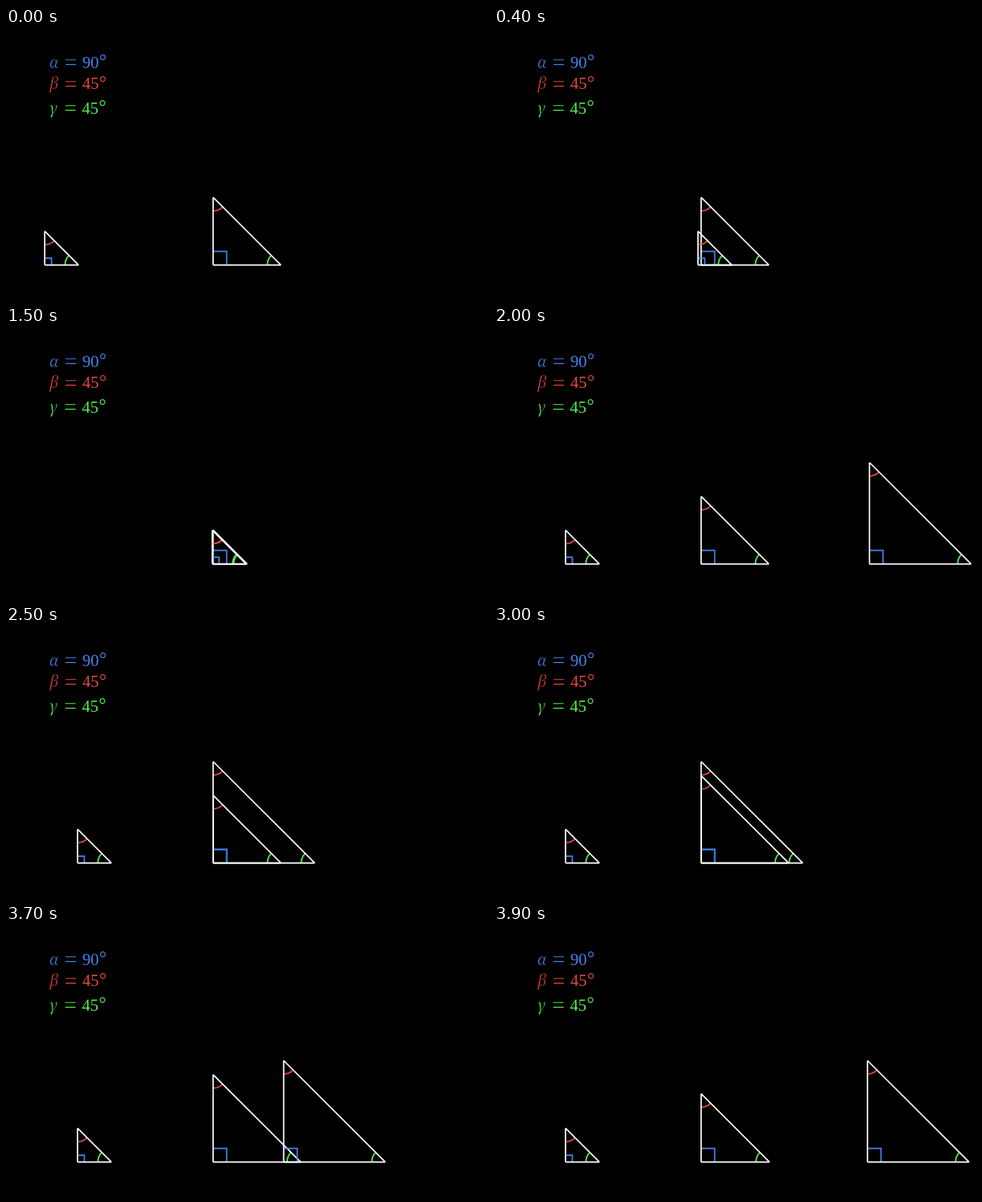
An HTML page that plays this animation: 600 by 338 pixels, repeating every 4 s.

```html
<!DOCTYPE html>
<html lang="en">
<head>
<meta charset="utf-8">
<title>Similar triangles</title>
<style>
html, body { margin: 0; width: 100%; height: 100%; overflow: hidden; background: #000; }
svg { display: block; width: 600px; height: 338px; }
text { font-family: "Liberation Serif", "Times New Roman", serif; font-size: 20.7px; }
.greek { font-family: "Noto Serif", serif; font-style: italic; font-size: 19px; stroke: #000; stroke-width: .5px; }
.equals { font-size: 29px; text-anchor: middle; stroke: #000; stroke-width: .5px; }
.degree { font-size: 23px; }
path { fill: none; stroke-width: 1.69; }
</style>
</head>
<body>
<svg id="stage" viewBox="0 0 600 338">
  <rect width="600" height="338" fill="#000"/>
</svg>
<script>
const LOOP = 4000, STEP = 100, LEAD = 100 / 3;
const UNIT = 600 * 9 / 128;
const BASE = 169 + 3 * UNIT;
const BLUE = '#4583ee', RED = '#e5483f', GREEN = '#50f04c';
const stage = document.getElementById('stage');

function add(parent, tag, attrs, content) {
  const node = document.createElementNS('http://www.w3.org/2000/svg', tag);
  for (const key in attrs) node.setAttribute(key, attrs[key]);
  if (content) node.textContent = content;
  return parent.appendChild(node);
}

function addLabel(letter, value, color, y, shift) {
  const row = add(stage, 'g', { fill: color });
  add(row, 'text', { x: 54, y, class: 'greek' }, letter);
  add(row, 'text', { x: 80.6 + shift, y: y + 3.2, class: 'equals' }, '=');
  add(row, 'text', { x: 95 + shift, y }, value);
  add(row, 'text', { x: 115.9 + shift, y: y - 0.6, class: 'degree' }, '°');
}

// Right isosceles triangle with its angle marks; lengths in units.
function makeTriangle(corner) {
  const group = add(stage, 'g', {});
  const [square, top, right, sides] = [BLUE, RED, GREEN, '#fff']
    .map(stroke => add(group, 'path', { stroke }));
  const c = corner * UNIT, r = 0.4 * UNIT, d = r * Math.SQRT1_2;

  return (position, leg, visible = true) => {
    group.style.display = visible ? '' : 'none';
    const x = 300 + position * UNIT;
    const apex = BASE - leg * UNIT, end = x + leg * UNIT;
    sides.setAttribute('d',
      `M${x} ${apex}V${BASE}M${x} ${BASE}H${end}M${end} ${BASE}L${x} ${apex}`);
    square.setAttribute('d', `M${x} ${BASE - c}h${c}v${c}`);
    top.setAttribute('d', `M${x} ${apex + r}A${r} ${r} 0 0 0 ${x + d} ${apex + d}`);
    right.setAttribute('d', `M${end - r} ${BASE}A${r} ${r} 0 0 1 ${end - d} ${BASE - d}`);
  };
}

const sigmoid = v => 1 / (1 + Math.exp(-v));
const EDGE = sigmoid(-5);

// Eased progress of a move lasting from start to stop.
function ease(time, start, stop) {
  const u = Math.min(1, Math.max(0, (time - start) / (stop - start)));
  return (sigmoid(10 * (u - 0.5)) - EDGE) / (1 - 2 * EDGE);
}

addLabel('α', '90', BLUE, 50, 0);
addLabel('β', '45', RED, 76.4, 0);
addLabel('γ', '45', GREEN, 106.6, -0.5);

const medium = makeTriangle(0.4);
const small = makeTriangle(0.2);
const large = makeTriangle(0.4);

function draw(ms) {
  const t = Math.floor(ms % LOOP / STEP) * STEP + LEAD;
  const back = ease(t, 1500, 2000), home = ease(t, 3500, 4000);

  small(-6 + 5 * ease(t, 0, 500) - 4 * back, 1);
  medium(-1, 2 - ease(t, 500, 1500) + back + ease(t, 2500, 3500) - home);
  large(4 - 5 * ease(t, 2000, 2500) + 5 * home, 3, t >= 2000);
}

const begin = performance.now();
function tick() {
  draw(performance.now() - begin);
  requestAnimationFrame(tick);
}
tick();
</script>
</body>
</html>
```
